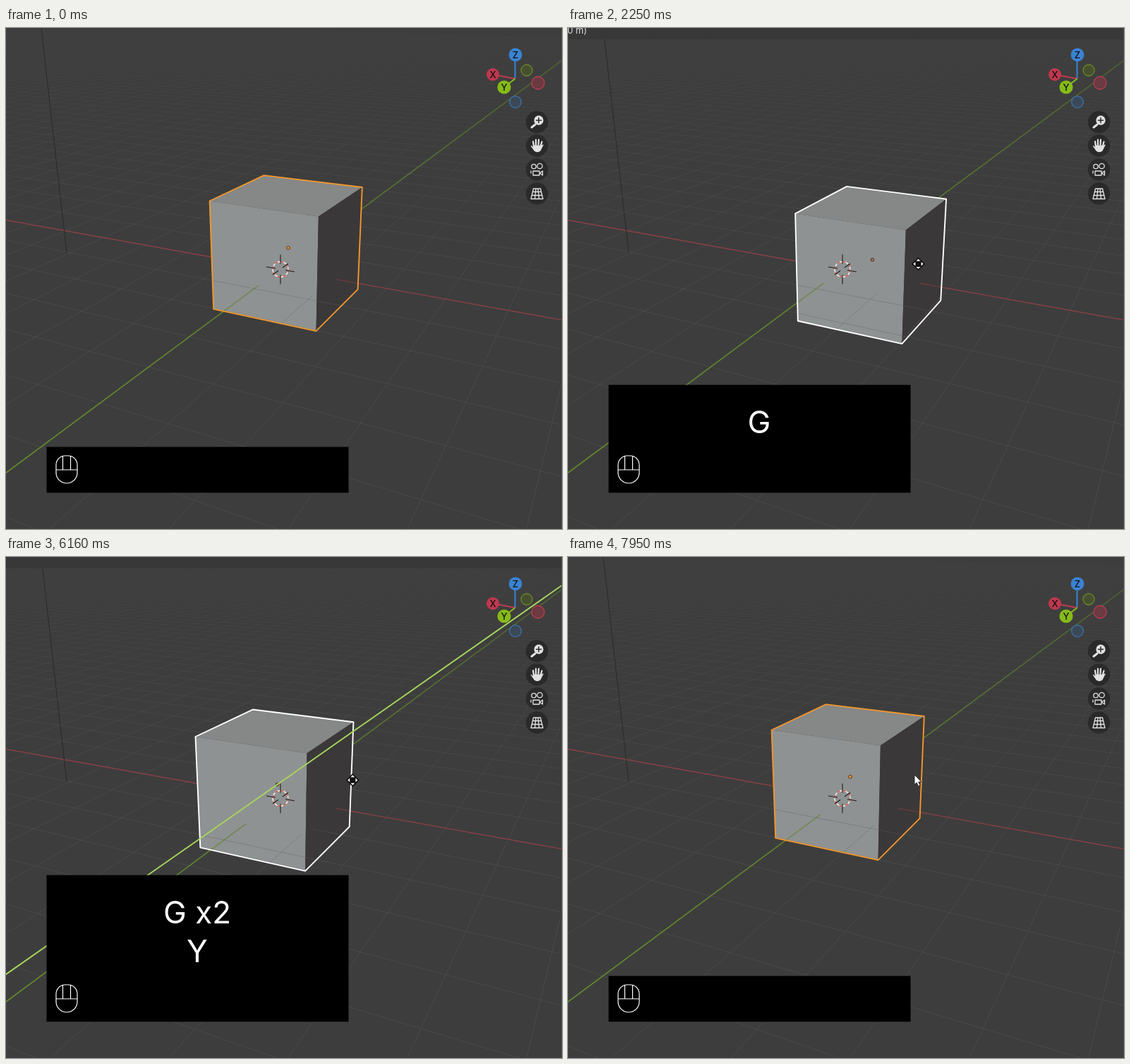
Write an HTML page that moves like this. It is 788x711 px and loops after 8000 ms.

```html
<!DOCTYPE html>
<html lang="en">
<head>
<meta charset="utf-8">
<title>Moving a cube</title>
<style>
html, body { margin: 0; width: 100%; height: 100%; overflow: hidden; background: #3d3d3d; }
svg { display: block; width: 100%; height: 100%; }
text { font-family: Inter, "Open Sans", sans-serif; }
</style>
</head>
<body>
<svg viewBox="0 0 788 711" fill="none">
  <defs>
    <linearGradient id="haze" x1="0" y1="0" x2="0" y2="711" gradientUnits="userSpaceOnUse">
      <stop offset="0" stop-color="#fff" stop-opacity=".12"/>
      <stop offset=".12" stop-color="#fff" stop-opacity=".38"/>
      <stop offset=".3" stop-color="#fff" stop-opacity=".75"/>
      <stop offset=".55" stop-color="#fff"/>
    </linearGradient>
    <linearGradient id="green" x1="0" y1="630" x2="786" y2="49" gradientUnits="userSpaceOnUse">
      <stop offset="0" stop-color="#658f2a"/>
      <stop offset=".5" stop-color="#5f802f"/>
      <stop offset="1" stop-color="#4d6132"/>
    </linearGradient>
    <mask id="fade" maskUnits="userSpaceOnUse" x="0" y="0" width="788" height="711">
      <rect width="788" height="711" fill="url(#haze)"/>
    </mask>
    <clipPath id="sunk"><path id="sunkArea"/></clipPath>
    <path id="grid" stroke="#5f5f5f" stroke-opacity=".38"/>
    <g id="axes">
      <path id="axisX" stroke="#96404a" stroke-width="1.2"/>
      <path id="axisY" stroke="url(#green)" stroke-width="1.6"/>
    </g>
  </defs>

  <rect width="788" height="711" fill="#3d3d3d"/>
  <use href="#grid" mask="url(#fade)"/>
  <use href="#axes"/>
  <path d="M50 0L86 319" stroke="#2a2a2a"/>

  <path id="top" fill="#868787"/>
  <path id="front" fill="#8f9292"/>
  <path id="side" fill="#3b3839"/>
  <g clip-path="url(#sunk)"><use href="#grid"/><use href="#axes" opacity=".65"/></g>
  <path id="outline" stroke-width="1.9" stroke-linejoin="round"/>
  <circle id="dot" r="2.3" stroke="#3a2a1a" stroke-width=".9"/>

  <g id="pivot" transform="translate(389 342.5)">
    <circle r="11" stroke="#f4f4f4" stroke-width="1.3"/>
    <circle r="11" stroke="#d8453c" stroke-width="1.3" stroke-dasharray="4.32"/>
    <path d="M0-21V-8M0 8V21M-20-3.5L-7-1.3M7 1.3L20 3.5M11-8L3-2.5M-11 7.5L-3 2" stroke="#1c1c1c" stroke-width="1.1"/>
  </g>
  <path id="guide" stroke="#a6d65c" stroke-width="1.9"/>

  <g id="header">
    <rect width="788" height="16" fill="#383838"/>
    <text id="readout" x="27" y="8" font-size="13" fill="#dcdcdc" text-anchor="end"></text>
  </g>
  <path d="M787.5 0V711" stroke="#494949"/>

  <g stroke-width="1.3">
    <circle cx="738" cy="60" r="8" fill="#46502f" stroke="#6c8a28"/>
    <circle cx="754" cy="78" r="9" fill="#6b3a42" stroke="#bd3d50"/>
    <circle cx="722" cy="105" r="8.3" fill="#3b4857" stroke="#3c75b4"/>
    <g stroke-width="2">
      <path d="M721.5 72V38" stroke="#3a82d2"/>
      <path d="M721.5 72L690 66" stroke="#c03a4f"/>
      <path d="M721.5 72L706 84" stroke="#87b91a"/>
    </g>
    <circle cx="722" cy="38" r="9.4" fill="#3a82d2"/>
    <circle cx="690" cy="66" r="9" fill="#bf384e"/>
    <circle cx="706" cy="84" r="9.6" fill="#86bb17"/>
  </g>
  <g font-size="13" font-weight="500" fill="#111" text-anchor="middle">
    <text x="722" y="42.7">Z</text><text x="690" y="70.5">X</text><text x="706" y="88.7">Y</text>
  </g>

  <g fill="#2a2a2a">
    <circle cx="752.5" cy="133.5" r="15.7"/><circle cx="752.5" cy="167" r="15.7"/>
    <circle cx="752.5" cy="201" r="15.7"/><circle cx="752.5" cy="235" r="15.7"/>
  </g>
  <g stroke="#e2e2e2" stroke-width="1.3" stroke-linecap="round" stroke-linejoin="round">
    <circle cx="755" cy="131" r="6" fill="#e2e2e2"/>
    <path d="M750 137L745 141" stroke-width="3"/>
    <path d="M755 127.5V134.5M751.5 131H758.5" stroke="#2a2a2a" stroke-width="1.5"/>
    <path d="M748 168L747 161M751 166V158.5M754.5 166L755 158.5M757.5 168L759.5 161.5" stroke-width="2.2"/>
    <path d="M744.5 167.5L748 171V167L758 167.5L761 166L757 174Q753 177 749 174Z" fill="#e2e2e2"/>
    <circle cx="748" cy="196.500" r="3.2"/><circle cx="756.5" cy="196" r="3.700"/>
    <path d="M747 203H756V209H747ZM756.500 206L760.500 203V209ZM744 203V206"/>
    <path d="M747.500 228H757.500L761 242.500H744ZM746.500 232.500H758.700M745.300 237.500H759.700M751 228L749.500 242.500M754 228L755.500 242.500"/>
  </g>

  <rect id="panel" x="57.500" width="428" fill="#000"/>
  <path id="rightButton" d="M92 627V608.500Q101 612 101 622V627Z" fill="#fff"/>
  <path d="M71 620a13 13 0 0 1 13-13h4a13 13 0 0 1 13 13v11a15 15 0 0 1-30 0ZM71 627H101M80.500 607.500V627M91.500 607.500V627" stroke="#fff" stroke-width="1.2"/>
  <g font-size="44" fill="#fff" text-anchor="middle">
    <text id="upper" x="271" y="520"></text><text id="lower" x="271" y="574.500"></text>
  </g>

  <path id="arrow" d="M0 0V14L3.300 11.200L5.500 16.300L8 15.200L5.800 10.200H10Z" fill="#fff" stroke="#222" stroke-width=".9"/>
  <g id="mover" fill="#fff" stroke="#111" stroke-width="1.2">
    <path d="M0-8.500L8.500 0L0 8.500L-8.500 0Z" fill="#111"/>
    <path d="M0-8L4.300-3.500H-4.300ZM0 8L4.300 3.500H-4.300ZM-8 0L-3.500-4.300V4.300ZM8 0L3.500-4.300V4.300Z"/>
  </g>
</svg>

<script>
const LOOP = 8000;
const el = id => document.getElementById(id);
const set = (id, name, value) => el(id).setAttribute(name, value);
const show = (id, on) => set(id, 'visibility', on ? 'visible' : 'hidden');

// Camera: image = HOME + (U.p, V.p) / (1 + W.p), with p relative to the resting cube
const HOME = [400, 312];
const U = [-71.05, -33.9, .35], V = [-11.75, 23.75, -74.45], W = [.032, -.065, -.028];
const FLOOR = [.0815, .16, -.373];
const dot = (a, b) => a[0] * b[0] + a[1] * b[1] + a[2] * b[2];
const cross = (a, b) => [a[1] * b[2] - a[2] * b[1], a[2] * b[0] - a[0] * b[2], a[0] * b[1] - a[1] * b[0]];
const add = (a, b) => a.map((n, i) => n + b[i]);

function project(p) {
  const w = 1 + dot(W, p);
  return [HOME[0] + dot(U, p) / w, HOME[1] + dot(V, p) / w];
}
const poly = pts => 'M' + pts.map(p => project(p).map(n => n.toFixed(2)).join(' ')).join('L');
const onFloor = (x, y) => add(FLOOR, [x, y, 0]);
const floorLine = (x1, y1, x2, y2) => poly([onFloor(x1, y1), onFloor(x2, y2)]);

// Moves parallel to the view plane, per pixel
const det = dot(U, cross(V, W));
const perX = cross(V, W).map(n => n / det), perY = cross(W, U).map(n => n / det);

// Nearest visible coordinate on a floor line
const nearY = x => (.75 + .032 * x) / .065;
const nearX = y => (.065 * y - .75) / .032;

function buildFloor() {
  let d = '';
  for (let x = -22; x <= 70; x++) if (x && nearY(x) > -75) d += floorLine(x, -75, x, nearY(x));
  for (let y = -75; y <= 11; y++) if (y) d += floorLine(nearX(y), y, 75, y);
  set('grid', 'd', d);
  set('axisX', 'd', floorLine(nearX(0), 0, 75, 0));
  set('axisY', 'd', floorLine(0, -280, 0, nearY(0)));
  set('guide', 'd', poly([[0, -280, 0], [0, 11, 0]]));
}

// Smooth curve through rows [time, value, ...] without overshoot
function track(rows, t, col) {
  const last = rows.length - 1;
  if (t <= rows[0][0]) return rows[0][col];
  if (t >= rows[last][0]) return rows[last][col];
  const i = rows.findIndex(r => r[0] > t) - 1;
  const slope = k => (rows[k + 1][col] - rows[k][col]) / (rows[k + 1][0] - rows[k][0]);
  const tangent = k => {
    if (k === 0 || k === last) return 0;
    const a = slope(k - 1), b = slope(k);
    return a * b <= 0 ? 0 : 2 * a * b / (a + b);
  };
  const h = rows[i + 1][0] - rows[i][0], s = (t - rows[i][0]) / h, q = 1 - s;
  return (1 + 2 * s) * q * q * rows[i][col] + s * q * q * h * tangent(i)
    + s * s * (3 - 2 * s) * rows[i + 1][col] - s * s * q * h * tangent(i + 1);
}

const GRAB = 800, CANCEL = 2420, REGRAB = 3720, LOCK = 4580, END = 7810;
// time, pointer x, pointer y
const enter = [[70, 722, 712], [400, 590, 510], [750, 465, 318]];
const settle = [[2620, 488.5, 313], [2920, 510, 329]];
// time, angle, radius
const swirl = [[GRAB, -243, 0], [1270, -90, 66], [1545, 0, 82.6], [1660, 38, 82.6],
  [1830, 100, 82.6], [CANCEL, 372, 24]];
// time, cube y, pointer x, pointer y
const slide = [[4780, 0, 510, 329], [5040, -3.08, 585, 230], [5250, -6.3, 626, 187],
  [5570, 2, 430, 372], [5780, 3.78, 395, 398], [6160, .458, 491, 317], [6480, -7.4, 643, 160],
  [6690, -.94, 487, 281], [6950, 4.88, 330, 430], [7290, -.12, 491, 313], [7600, 0, 491, 309]];

function drawCube(c) {
  const at = (x, y, z) => add(c, [x, y, z]);
  const A = at(1, -1, 1), B = at(-1, -1, 1), C = at(-1, 1, 1), D = at(1, 1, 1);
  const E = at(1, 1, -1), F = at(-1, 1, -1), G = at(-1, -1, -1);
  set('top', 'd', poly([A, B, C, D]) + 'Z');
  set('front', 'd', poly([D, C, F, E]) + 'Z');
  set('side', 'd', poly([C, B, G, F]) + 'Z');
  set('outline', 'd', poly([A, B, G, F, E, D]) + 'Z');
  // The part of the faces under the floor, where floor lines pass in front
  const f = Math.min(1, FLOOR[2] - c[2]);
  set('sunkArea', 'd', f <= -1 ? '' :
    poly([E, F, at(-1, 1, f), at(1, 1, f)]) + 'Z' + poly([F, G, at(-1, -1, f), at(-1, 1, f)]) + 'Z');
  const [x, y] = project(c);
  set('dot', 'cx', x);
  set('dot', 'cy', y);
}

function draw(t) {
  const free = t >= GRAB && t < CANCEL, locked = t >= LOCK && t < END;
  const grab = free || (t >= REGRAB && t < END);
  let cube = [0, 0, 0], mouse, label = '';

  if (free) {
    const a = track(swirl, t, 1) * Math.PI / 180, r = track(swirl, t, 2);
    const dx = r * Math.cos(a), dy = -r * Math.sin(a);
    cube = perX.map((n, i) => n * dx + perY[i] * dy);
    mouse = [465 + dx, 318 + dy];
    label = (r / 74.3).toFixed(3) + ' m)';
  } else if (t < LOCK) {
    const path = t < GRAB ? enter : settle;
    mouse = [track(path, t, 1), track(path, t, 2)];
  } else {
    if (locked) cube = [0, track(slide, t, 1), 0];
    mouse = [track(slide, t, 2), track(slide, t, 3)];
  }

  drawCube(cube);
  set('outline', 'stroke', grab ? '#fff' : '#f2972c');
  set('dot', 'fill', free || locked ? '#a87058' : '#f2972c');
  show('guide', locked);
  show('header', grab);
  el('readout').textContent = label;

  const g = t >= REGRAB && t < 6640 ? 'G x2' : t >= GRAB && t < REGRAB ? 'G' : '';
  const keys = [g, t >= LOCK && t < 7500 ? 'Y' : ''].filter(Boolean);
  const top = [594.5, 506.5, 451.5][keys.length];
  set('panel', 'y', top);
  set('panel', 'height', 659.5 - top);
  el('lower').textContent = keys.pop() || '';
  el('upper').textContent = keys.pop() || '';
  show('rightButton', (t >= CANCEL && t < 2560) || (t >= END && t < 7940));

  show('mover', grab);
  show('arrow', !grab && t >= 70);
  for (const id of ['mover', 'arrow']) set(id, 'transform', `translate(${mouse})`);
}

buildFloor();
const start = performance.now();
function tick() {
  draw((performance.now() - start) % LOOP);
  requestAnimationFrame(tick);
}
tick();
</script>
</body>
</html>
```
